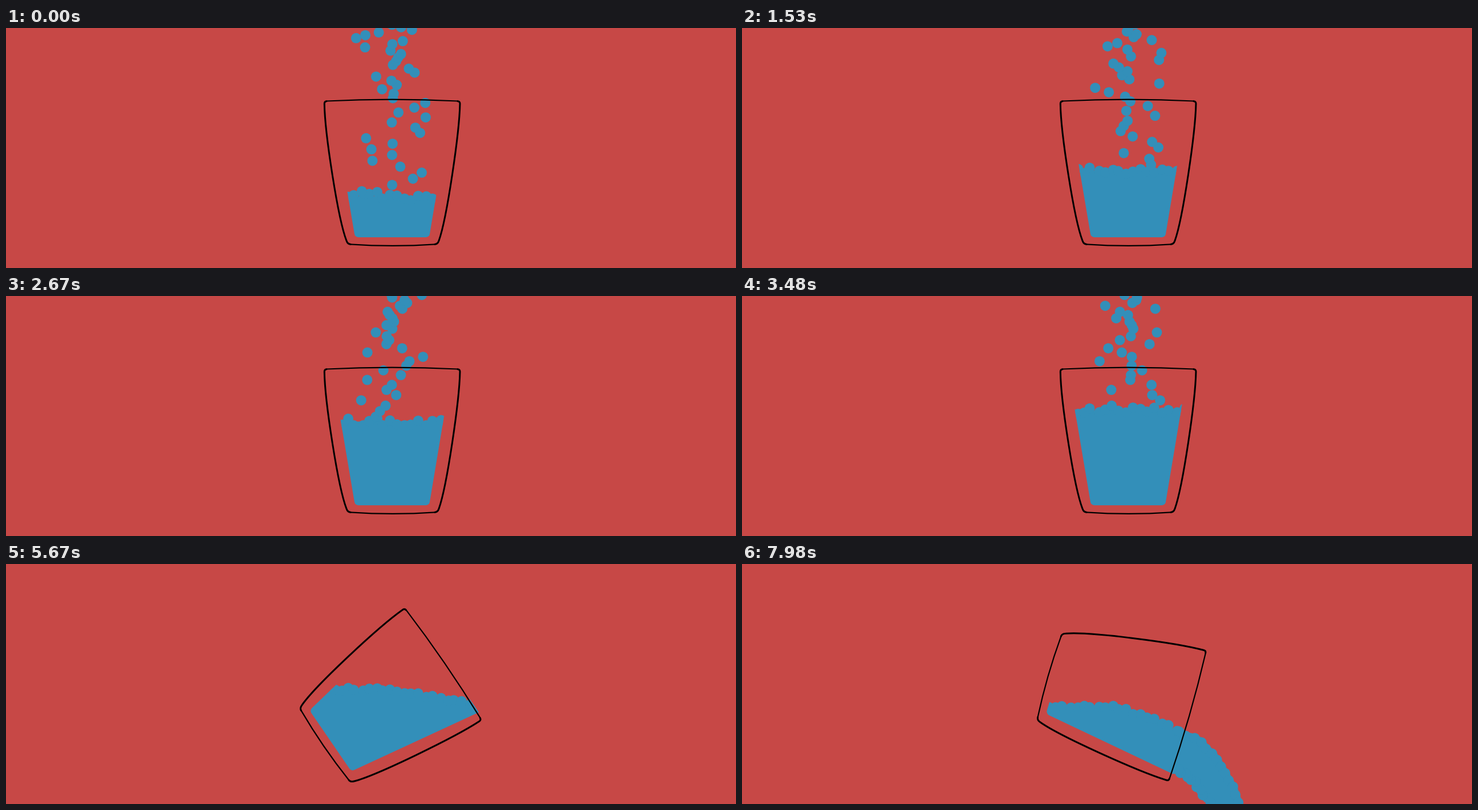
These frames come from a looping animation (1280x422 px, 8000 ms). An HTML page with a canvas:

```html
<!DOCTYPE html>
<html lang="en">
<head>
<meta charset="utf-8">
<title>Glass</title>
<style>
html, body { margin: 0; width: 100%; height: 100%; overflow: hidden; background: #c74846; }
canvas { display: block; width: 1280px; height: 422px; }
</style>
</head>
<body>
<canvas id="stage" width="1280" height="422"></canvas>
<script>
const ctx = document.getElementById('stage').getContext('2d');
const LOOP = 8000;
const RED = '#c74846', BLUE = '#338fb9';
const R = 9;
const PIVOT = { x: 677, y: 237 };
const POUR = { interval: 0.027, end: 3.48, top: -10, speed: 150, gravity: 250, spread: 66 };

const ramp = (t, from, to) => Math.max(0, Math.min(1, (t - from) / (to - from)));
const easeOut = u => u * (2 - u);

// Repeatable noise in -1..1
function hash(a, b) {
  const v = Math.sin(a * 127.1 + b * 311.7) * 43758.5453;
  return (v - Math.floor(v)) * 2 - 1;
}

function wobble(i, t, period) {
  const k = Math.floor(t / period), f = t / period - k;
  return hash(i, k) * (1 - f) + hash(i, k + 1) * f;
}

// A small nudge, a wait, a steady turn, then a slight swing back.
function tilt(t) {
  const degrees = 5 * ramp(t, 3960, 4050) + 105 * ramp(t, 4750, 6660)
    - 4 * easeOut(ramp(t, 6670, 7500));
  return degrees * Math.PI / 180;
}

// Water line: level on the left, bending down towards the lip once the glass leans.
function surfaceAt(t) {
  const filled = ramp(t, 0, 4050);
  const level = 296 - 107 * filled * (1.2 - 0.2 * filled) + 4 * ramp(t, 4050, 4950)
    + 27 * ramp(t, 4950, 5690) + 32 * ramp(t, 6390, 7980);
  const bend = 0.0447 * ramp(t, 5400, 6390) - 0.0149 * ramp(t, 6390, 7980);
  return x => level + bend * Math.max(0, x - 640) ** 1.5;
}

function ball(x, y) {
  ctx.beginPath();
  ctx.arc(x, y, R, 0, Math.PI * 2);
  ctx.fill();
}

function rotateGlass(angle) {
  ctx.translate(PIVOT.x, PIVOT.y);
  ctx.rotate(angle);
  ctx.translate(-PIVOT.x, -PIVOT.y);
}

function rotated(x, y, angle) {
  const dx = x - PIVOT.x, dy = y - PIVOT.y, c = Math.cos(angle), s = Math.sin(angle);
  return { x: PIVOT.x + dx * c - dy * s, y: PIVOT.y + dx * s + dy * c };
}

function clipInside(angle) {
  ctx.save();
  rotateGlass(angle);
  ctx.beginPath();
  ctx.moveTo(571, 125);
  ctx.arcTo(612, 368, 677, 368, 7);
  ctx.arcTo(742, 368, 782.5, 125, 7);
  ctx.lineTo(782.5, 125);
  ctx.restore();
  ctx.clip();
}

function drawWater(t, angle, surface) {
  const pouring = t < 4000;
  const lift = pouring ? 8 : 4, period = pouring ? 450 : 900;
  ctx.save();
  clipInside(angle);
  ctx.beginPath();
  ctx.moveTo(500, 450);
  for (let x = 500; x <= 860; x += 12) ctx.lineTo(x, surface(x));
  ctx.lineTo(860, 450);
  ctx.fill();
  for (let i = 0; i < 27; i++) {
    const x = 524 + i * 12.5 + 3 * hash(i, 7);
    ball(x, surface(x) + lift * wobble(i, t, period));
  }
  ctx.restore();
}

function drawDrops(t, surface) {
  const now = t / 1000, { interval, end, top, speed, gravity, spread } = POUR;
  for (let n = Math.ceil((now - 1.3) / interval); n * interval <= Math.min(now, end); n++) {
    const age = now - n * interval, h = hash(n, 3);
    const x = 677 + Math.sign(h) * Math.abs(h) ** 1.8 * spread;
    const y = top + speed * age + gravity * age * age / 2;
    if (y < surface(x)) ball(x, y);
  }
}

// Point on a quadratic curve
function curve(a, b, c, s) {
  const mix = k => (1 - s) ** 2 * a[k] + 2 * s * (1 - s) * b[k] + s * s * c[k];
  return { x: mix('x'), y: mix('y') };
}

function drawStream(t, angle, surface) {
  if (t < 6000) return;
  const progress = ramp(t, 6000, 6700) ** 2;
  const reach = 915 - 43 * easeOut(ramp(t, 6700, 7980));
  const lip = rotated(773, 125, angle);
  const crest = { x: lip.x + 8, y: surface(lip.x + 8) };
  const upper = [crest, { x: crest.x + 0.85 * (reach - crest.x), y: crest.y + 38 }, { x: reach, y: 436 }];
  const lower = [lip, { x: lip.x + 0.55 * (reach - 42 - lip.x), y: lip.y + 15 }, { x: reach - 42, y: 440 }];
  const steps = 2 + Math.round(11 * progress);
  const edge = side => Array.from({ length: steps + 1 }, (_, i) => {
    const p = curve(...side, progress * i / steps);
    const n = i ? 2 * wobble(i + side[0].x, 0, 1) : 0;
    return { x: p.x + n, y: p.y - n };
  });
  const outline = [...edge(upper), ...edge(lower).reverse()];
  ctx.beginPath();
  outline.forEach(p => ctx.lineTo(p.x, p.y));
  ctx.closePath();
  ctx.fill();
  ctx.lineWidth = 2 * R - 4;
  ctx.lineJoin = 'round';
  ctx.strokeStyle = BLUE;
  ctx.stroke();
  outline.forEach(p => ball(p.x, p.y));

  // Two drops thrown ahead of the stream
  const s = (t - 6390) / 1000;
  for (let i = 0; i < 2; i++) {
    ball(864 - 14 * i + 115 * s, 323 - 3 * i + 100 * s + 125 * s * s);
  }
}

function drawGlass(angle) {
  ctx.save();
  rotateGlass(angle);
  ctx.strokeStyle = '#000';
  ctx.lineCap = 'round';
  ctx.lineWidth = 3;
  ctx.stroke(new Path2D('M562 128.7Q558.3 129 558.3 133C559 185 582 335 597 374Q599 380 604 380.3'));
  ctx.stroke(new Path2D('M792 128.7Q796 129 796 133C795 185 773 335 759 374Q757 380 752 380.3'));
  ctx.lineWidth = 2.2;
  ctx.stroke(new Path2D('M562 128.5Q677 122.7 792 128.5M604 380.3Q678 385.5 752 380.3'));
  ctx.restore();
}

function draw(t) {
  const angle = tilt(t), surface = surfaceAt(t);
  ctx.fillStyle = RED;
  ctx.fillRect(0, 0, 1280, 422);
  ctx.fillStyle = BLUE;
  drawWater(t, angle, surface);
  drawDrops(t, surface);
  drawStream(t, angle, surface);
  drawGlass(angle);
}

function frame() {
  draw(performance.now() % LOOP);
  requestAnimationFrame(frame);
}
frame();
</script>
</body>
</html>
```
